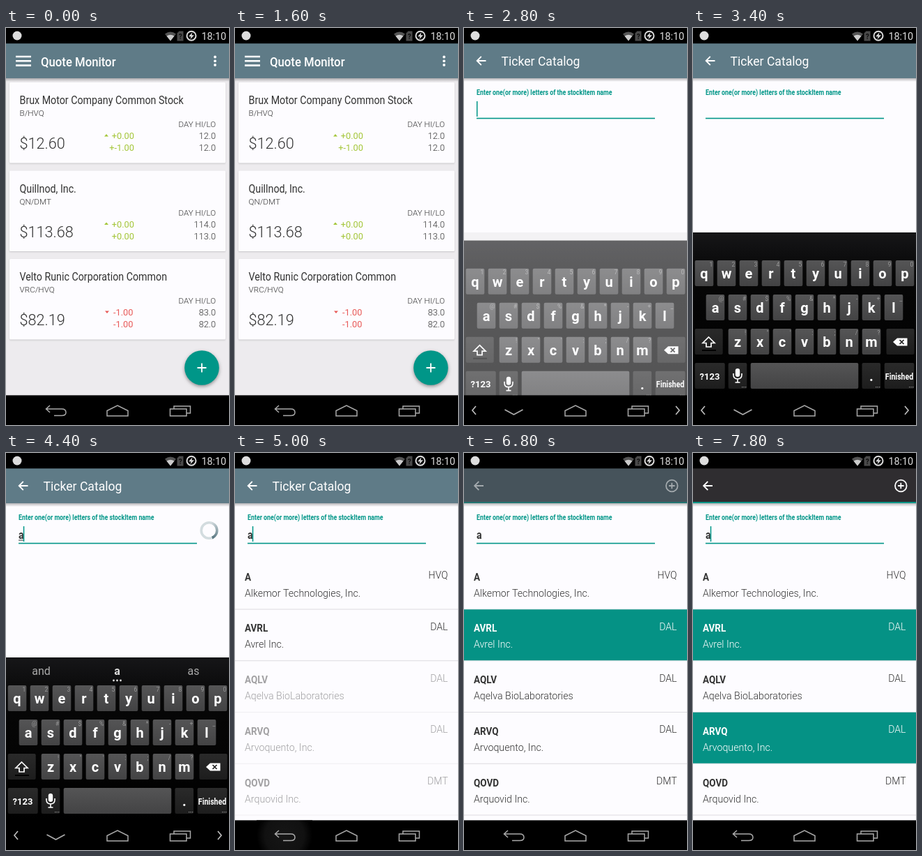
Recreate the animation shown at these times as an HTML page with a canvas. Size 320 by 569 pixels, loop 8000 ms.

```html
<!DOCTYPE html>
<html lang="en">
<head>
<meta charset="utf-8">
<title>Quote Monitor</title>
<style>
html, body { margin: 0; width: 100%; height: 100%; overflow: hidden; background: #000; }
canvas { display: block; width: 100vw; height: 100vh; }
</style>
</head>
<body>
<canvas id="stage"></canvas>
<script>
const W = 320, H = 569, LOOP = 8000, STEP = 200;
const STATUS_END = 22.2, BAR_END = 72, NAV_TOP = 526.4;
const canvas = document.getElementById('stage');
const ctx = canvas.getContext('2d');

const TEAL = '#009688', BAR = '#5f7b87', DARK_BAR = '#2f2d30', PAPER = '#fdfcff', INK = '#333';
const GREEN = '#a4c639', RED = '#e85a58', NAV = '#aaa';

// Moments of the story, in ms
const T = { selector: 2400, keyboard: 2600, typed: 4200, results: 4800, hidden: 5000,
            firstPick: 6800, secondPick: 7600 };
const BLINK_RESTARTS = [2600, T.typed, T.hidden, T.secondPick];

const CARDS = [
  { name: 'Brux Motor Company Common Stock', code: 'B/HVQ', price: '$12.60', change: ['+0.00', '+-1.00'], range: ['12.0', '12.0'], up: true },
  { name: 'Quillnod, Inc.', code: 'QN/DMT', price: '$113.68', change: ['+0.00', '+0.00'], range: ['114.0', '113.0'], up: true },
  { name: 'Velto Runic Corporation Common', code: 'VRC/HVQ', price: '$82.19', change: ['-1.00', '-1.00'], range: ['83.0', '82.0'], up: false }
];
const RESULTS = [
  ['A', 'Alkemor Technologies, Inc.', 'HVQ'],
  ['AVRL', 'Avrel Inc.', 'DAL'],
  ['AQLV', 'Aqelva BioLaboratories', 'DAL'],
  ['ARVQ', 'Arvoquento, Inc.', 'DAL'],
  ['QOVD', 'Arquovid Inc.', 'DMT']
];

const clamp = v => Math.max(0, Math.min(1, v));

function rect(x, y, w, h, color) {
  ctx.fillStyle = color;
  ctx.fillRect(x, y, w, h);
}

function roundRect(x, y, w, h, r, fill) {
  ctx.beginPath();
  ctx.roundRect(x, y, w, h, r);
  ctx.fillStyle = fill;
  ctx.fill();
}

function disc(x, y, r, color) {
  ctx.beginPath();
  ctx.arc(x, y, r, 0, 7);
  ctx.fillStyle = color;
  ctx.fill();
}

// Path data, painted as an outline or as a solid shape
function stroke(d, color, width = 2) {
  ctx.strokeStyle = color;
  ctx.lineWidth = width;
  ctx.stroke(new Path2D(d));
}
function solid(d, color) {
  ctx.fillStyle = color;
  ctx.fill(new Path2D(d));
}

function text(str, x, y, size, { weight = 400, color = INK, align = 'left', condensed = false } = {}) {
  ctx.save();
  ctx.translate(x, y);
  if (condensed) ctx.scale(0.88, 1);
  ctx.font = `${weight} ${size}px Roboto, sans-serif`;
  ctx.textAlign = align;
  ctx.fillStyle = color;
  ctx.fillText(str, 0, 0);
  ctx.restore();
}

function withShadow(blur, dy, alpha, draw) {
  ctx.save();
  ctx.shadowColor = `rgba(0,0,0,${alpha})`;
  ctx.shadowBlur = blur * canvas.width / W;
  ctx.shadowOffsetY = dy * canvas.height / H;
  draw();
  ctx.restore();
}

function statusBar() {
  rect(0, 0, W, STATUS_END, '#000');
  disc(16, 11, 6.5, '#ddd');
  solid('M236 18.5 L228 8.5 Q236 2.5 244 8.5 Z', '#555');
  solid('M236 18.5 L230.5 11.5 Q236 8 241.5 11.5 Z', '#ccc');
  solid('M248.5 4.5 H254.5 V18.5 H245.5 V7.5 Z', '#4a4a4a');
  text('?', 250.2, 15.5, 10, { weight: 700, color: '#111', align: 'center' });
  ctx.beginPath();
  ctx.arc(266, 11.2, 6.5, 0, 7);
  ctx.strokeStyle = '#ddd';
  ctx.lineWidth = 2;
  ctx.stroke();
  solid('M267.5 6.2 L262 12.2 H265.5 L264.5 16.2 L270 10.2 H266.5 Z', '#ddd');
  text('18:10', 316, 16.5, 14.3, { color: '#ddd', align: 'right' });
}

function appBar(color) {
  const shade = ctx.createLinearGradient(0, BAR_END, 0, BAR_END + 5);
  shade.addColorStop(0, 'rgba(0,0,0,.28)');
  shade.addColorStop(1, 'rgba(0,0,0,0)');
  rect(0, BAR_END, W, 5, shade);
  rect(0, 22, W, BAR_END - 22, color);
}

function backArrow(x, color) {
  stroke(`M${x + 14} 47 H${x + 1.5} M${x + 7.3} 40.8 L${x + 1.2} 47 L${x + 7.3} 53.2`, color, 1.9);
}

function navBar(keyboardMode, pressed) {
  rect(0, NAV_TOP, W, H - NAV_TOP, '#000');
  if (pressed) {
    const glow = ctx.createRadialGradient(71, 548, 0, 71, 548, 40);
    glow.addColorStop(0, '#161616');
    glow.addColorStop(.7, '#111');
    glow.addColorStop(1, '#000');
    rect(31, NAV_TOP, 80, H - NAV_TOP, glow);
  }
  if (keyboardMode) {
    stroke('M17 542 L12 548 L17 554 M304 542 L309 548 L304 554', '#bbb', 1.7);
    stroke('M58.5 547 L71.5 554 L84.5 547', NAV, 1.7);
  } else {
    stroke('M63 541 L57.5 546 L63 551 M57.5 546 H80 Q86 546 86 551 Q86 555.5 80 555.5 H69', NAV, 1.5);
  }
  stroke('M145 556 V548.5 L160 541 L175 548.5 V556 Z', NAV, 1.5);
  stroke('M235.5 546 H259 V556 H235.5 Z M241 546 V542 H264.5 V552 H259', NAV, 1.5);
}

function card({ name, code, price, change, range, up }, top) {
  withShadow(2, 1, .16, () => roundRect(5, top, 310, 115.5, 1.5, PAPER));
  const tint = up ? GREEN : RED;
  const right = { weight: 300, align: 'right' };
  text(name, 19.5, top + 31, 16.2, { condensed: true });
  text(code, 19.5, top + 48, 11.7, { weight: 300 });
  text(price, 19.5, top + 95, 21.7, { weight: 300 });
  text('DAY HI/LO', 301, top + 64, 11.6, right);
  const y = top + 76;
  solid(up ? `M141 ${y + 1.5} L144 ${y - 2} L147 ${y + 1.5} Z` : `M142 ${y - 1.5} L145 ${y + 2} L148 ${y - 1.5} Z`, tint);
  for (let i = 0; i < 2; i++) {
    const base = top + 81 + 17 * i;
    text(change[i], up ? 184 : 182.5, base, 12.8, { ...right, weight: 400, color: tint });
    text(range[i], 301, base, 12.8, right);
  }
}

function trackerScreen() {
  rect(0, 22, W, 505, '#edebee');
  CARDS.forEach((c, i) => card(c, 78 + 126.5 * i));
  appBar(BAR);
  stroke('M14 41 H36 M14 47.3 H36 M14 53.6 H36', '#fff', 2.6);
  text('Quote Monitor', 50, 54.5, 19, { weight: 500, color: '#fff', condensed: true });
  [41.5, 47.3, 53].forEach(y => disc(300, y, 1.9, '#fff'));
  withShadow(5, 2, .4, () => disc(281, 487, 24.8, TEAL));
  stroke('M274.5 487 H287.5 M281 480.5 V493.5', '#fff', 1.8);
}

function searchField(t) {
  text('Enter one(or more) letters of the stockItem name', 18, 96, 10.05, { weight: 700, color: TEAL, condensed: true });
  rect(18, 128.7, 256, 1.6, TEAL);
  const typed = t >= T.typed;
  if (typed) {
    text('a', 18, 122.5, 16, { weight: 700, condensed: true });
    if (t < T.results) rect(18, 124.5, 7, 1, INK);
  }
  const restart = BLINK_RESTARTS.filter(r => r <= t).pop();
  if ((t - restart) % 1000 < 500) rect(typed ? 24.8 : 18, 105, 1.5, 22, TEAL);
}

function spinner(t) {
  const ring = ctx.createConicGradient((t - 4400) / 1000 * Math.PI * 2 + 1.2, 291.5, 111);
  ring.addColorStop(0, '#d3dcdf');
  ring.addColorStop(.6, '#d3dcdf');
  ring.addColorStop(1, '#56747f');
  ctx.beginPath();
  ctx.arc(291.5, 111, 11.3, 0, 7);
  ctx.strokeStyle = ring;
  ctx.lineWidth = 3.6;
  ctx.stroke();
}

function resultRow([code, name, market], i, t) {
  const top = 150.5 + 73.75 * i;
  const picked = (i === 1 && t >= T.firstPick) || (i === 3 && t >= T.secondPick);
  const start = i < 2 ? T.results : T.hidden;
  const light = { weight: 300, color: picked ? '#fff' : INK };
  ctx.globalAlpha = t < start ? 0 : clamp(.45 + (t - start) / 360);
  rect(0, top + 73, W, 1, '#dddce0');
  if (picked) rect(0, top, W, 73, '#059285');
  text(code, 14, top + 32, 15.3, { weight: 700, color: light.color, condensed: true });
  text(name, 14, top + 55, 14.2, light);
  text(market, 305.5, top + 29.5, 14, { ...light, align: 'right' });
  ctx.globalAlpha = 1;
}

function selectionBar(progress) {
  appBar(BAR);
  ctx.globalAlpha = progress;
  rect(0, 22, W, 50, DARK_BAR);
  rect(0, 70, W, 2, TEAL);
  backArrow(14, '#fff');
  stroke('M290 47 a8.3 8.3 0 1 0 16.6 0 a8.3 8.3 0 1 0 -16.6 0 M294 47 H302.6 M298.3 42.7 V51.3', '#fff', 1.8);
  ctx.globalAlpha = 1;
}

function key(x, y, w, special) {
  const face = ctx.createLinearGradient(0, y, 0, y + 37);
  face.addColorStop(0, special ? '#2a2a2a' : '#555556');
  face.addColorStop(1, special ? '#1d1d1d' : '#434344');
  roundRect(x, y, w, 37, 2, face);
}

function letterRow(letters, hints, firstCenter, y) {
  [...letters].forEach((letter, i) => {
    const cx = firstCenter + 32 * i;
    key(cx - 13.3, y, 26.6);
    text(letter, cx, y + 26, 20, { weight: 700, color: '#fff', align: 'center' });
    text(hints[i], cx + 12.3, y + 8.5, 8.5, { color: '#999', align: 'right' });
  });
}

function keyboard(t) {
  const shown = clamp((t - T.keyboard) / 300);
  const white = { color: '#fff', weight: 700, align: 'center' };
  ctx.save();
  rect(0, 293, W, 234, '#f3f2f4');
  ctx.translate(0, 35 * (1 - shown));
  const back = ctx.createLinearGradient(0, 293, 0, 526);
  back.addColorStop(0, '#161618');
  back.addColorStop(.25, '#070707');
  back.addColorStop(1, '#000');
  rect(0, 293, W, 234, back);

  if (t >= T.typed) {
    text('and', 50.5, 318, 16, { color: '#aaa', align: 'center' });
    text('a', 159.5, 318, 16, { ...white, color: '#ddd' });
    text('as', 269, 318, 16, { color: '#aaa', align: 'center' });
    [154.5, 159.5, 164.5].forEach(x => disc(x, 326, 1.4, '#ddd'));
  }

  letterRow('qwertyuiop', '1234567890', 16, 333);
  letterRow('asdfghjkl', '@#$%&*-+_', 32, 382);
  letterRow('zxcvbnm', "!\"':;/?", 64, 431);

  key(2.7, 431, 40, true);
  stroke('M22.5 443 L31 451.5 H26 V457 H19 V451.5 H14 Z', '#fff', 1.7);
  rect(13, 461, 20, 2, '#000');
  key(277.5, 431, 40, true);
  solid('M287 450 L293 444.5 H307.5 V455.5 H293 Z', '#fff');
  stroke('M296.5 447 L302.5 453 M302.5 447 L296.5 453', '#222', 1.7);

  key(2.7, 480, 43, true);
  text('?123', 24, 503.5, 13, white);
  key(50.7, 480, 26.6, true);
  roundRect(60.8, 488, 6.4, 12, 3.2, '#fff');
  stroke('M58 495 V497 Q58 503 64 503 Q70 503 70 497 V495 M64 503 V508 M60.5 508 H67.5', '#fff', 1.6);
  key(82.7, 480, 154.6);
  key(242.5, 480, 26.6, true);
  text('.', 256, 506, 20, white);
  key(274.7, 480, 42.6, true);
  text('Finished', 296, 503.5, 12, { ...white, condensed: true });
  [70, 262, 310].forEach(x => [0, 2.5, 5].forEach(d => rect(x + d, 514, 1.3, 1.3, '#888')));

  if (shown < 1) {
    ctx.globalAlpha = 1 - shown;
    rect(0, 293, W, 234, PAPER);
    ctx.globalAlpha = 1;
  }
  ctx.restore();
}

function selectorScreen(t) {
  rect(0, 22, W, 505, PAPER);
  searchField(t);
  if (t >= T.typed && t < T.results) spinner(t);
  RESULTS.forEach((row, i) => resultRow(row, i, t));
  if (t >= T.firstPick) {
    selectionBar(clamp(.5 + (t - T.firstPick) / 400));
  } else {
    appBar(BAR);
    backArrow(17.5, '#fff');
    text('Ticker Catalog', 53.5, 54, 17.6, { color: '#fff' });
  }
  if (t > T.keyboard && t < T.hidden) keyboard(t);
}

function draw(now) {
  const t = Math.floor(now % LOOP / STEP) * STEP;
  const ratio = window.devicePixelRatio || 1;
  const width = Math.round(innerWidth * ratio), height = Math.round(innerHeight * ratio);
  if (canvas.width !== width || canvas.height !== height) {
    canvas.width = width;
    canvas.height = height;
  }
  ctx.setTransform(width / W, 0, 0, height / H, 0, 0);
  if (t < T.selector) trackerScreen();
  else selectorScreen(t);
  statusBar();
  navBar(t >= T.selector && t < T.hidden, t >= T.results && t <= T.hidden);
}

const begin = performance.now();
function tick() {
  draw(performance.now() - begin);
  requestAnimationFrame(tick);
}
tick();
</script>
</body>
</html>
```
